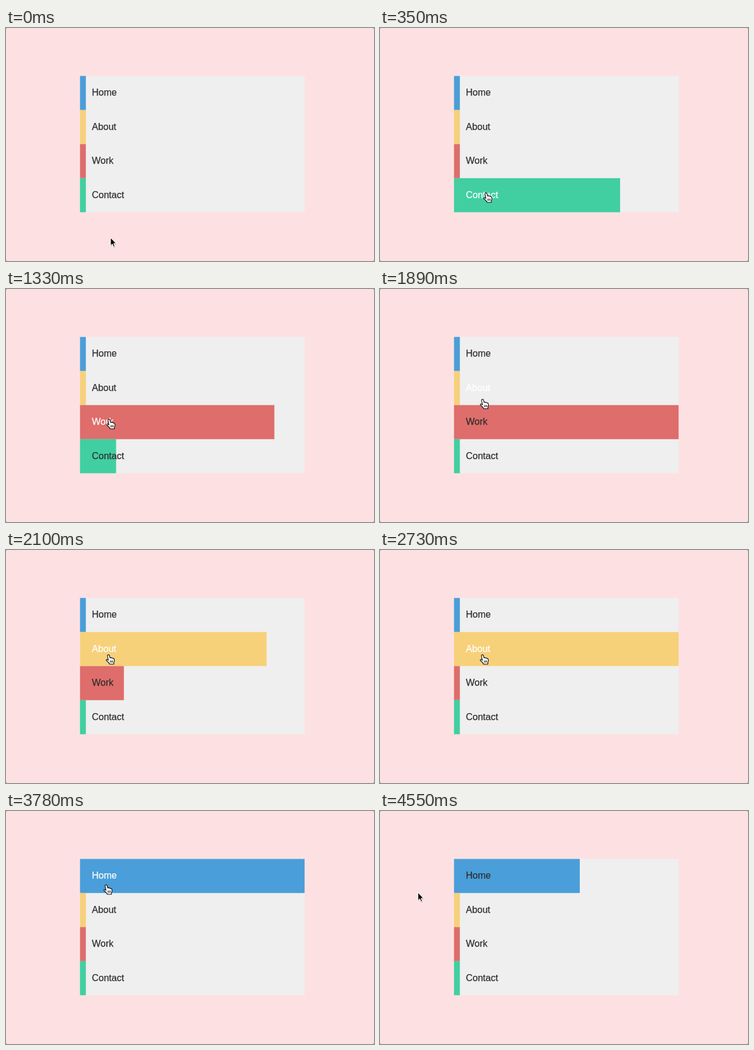
Animation, 630 px wide and 400 px high, one loop 4.62 s. Source, as an HTML page:

```html
<!DOCTYPE html>
<html lang="en">
<head>
<meta charset="utf-8">
<title>Menu hover</title>
<style>
  html, body { margin: 0; width: 100%; height: 100%; overflow: hidden; background: #fde1e2; }
  svg { display: block; }
  text { font: 16px "Liberation Sans", Arial, sans-serif; stroke-width: .25px; }
</style>
</head>
<body>
<svg width="630" height="400" viewBox="0 0 630 400">
  <rect width="630" height="400" fill="#6a6466"/>
  <rect width="630" height="400" rx="2" fill="#fde1e2"/>
  <rect x="126.7" y="82.3" width="384.5" height="234" fill="#efefef"/>
  <g id="menu"></g>
  <g id="arrow">
    <path d="M0 0V14.2L3.2 11.2L5.4 16.2L7.7 15.2L5.6 10.4H9.8Z" opacity=".18" transform="translate(.4 1.4)"/>
    <path d="M0 0V13.6L3.1 10.7L5.3 15.6L7.4 14.7L5.3 9.9H9.4Z" stroke="#fff"/>
  </g>
  <g id="hand" stroke="#000" stroke-linecap="round" stroke-linejoin="round">
    <path transform="translate(-5 -1)" fill="#fff" stroke-width="1.1"
      d="M4 1.5C5 .3 6.6 .8 7 2L8 6.2C8.6 5.3 10.2 5.4 10.7 6.6C11.5 5.9 12.8 6.2 13.2 7.4C14.2 6.9 15.2 7.5 15.4 8.8C15.8 11 15.5 12.5 14.6 14V17H7.3C6.8 15.2 4.5 13 2.2 11C.8 9.6 2 8.3 3.4 9L5.2 10.2L3.7 3Q3.5 2 4 1.5Z"/>
    <path d="M3.6 10v3m2-3v3m2-3v3" fill="none" stroke-width=".9"/>
  </g>
</svg>
<script>
const LOOP = 4620, TICK = 70, FADE = 400;
const LEFT = 126.7, TOP = 82.3, ROW = 58.5, THIN = 10, FULL = 384.5;

const items = [
  { label: "Home", fill: "#4a9ed9", from: 2910, to: 4442 },
  { label: "About", fill: "#f7d07a", from: 1890, to: 2910 },
  { label: "Work", fill: "#de6d6b", from: 1103, to: 1890 },
  { label: "Contact", fill: "#41cfa1", from: 175, to: 1103 }
];

// The pointer rests between these eased moves.
const home = { x: 179, y: 360 };
const moves = [
  { from: 70, to: 360, x: 181, y: 283 },
  { from: 910, to: 1260, x: 176, y: 224 },
  { from: 1680, to: 1980, x: 175, y: 180 },
  { from: 2730, to: 3080, x: 171, y: 127 },
  { from: 4340, to: 4550, x: 65, y: 140 }
];

const $ = id => document.getElementById(id);
const clamp = v => Math.min(1, Math.max(0, v));
const smooth = k => k * k * (3 - 2 * k);

// CSS "ease": cubic-bezier(.25, .1, .25, 1)
function ease(x) {
  x = clamp(x);
  const curve = (s, a, b) => 3 * a * s * (1 - s) ** 2 + 3 * b * s * s * (1 - s) + s ** 3;
  let lo = 0, hi = 1;
  for (let i = 0; i < 24; i++) {
    const mid = (lo + hi) / 2;
    if (curve(mid, .25, .25) < x) lo = mid; else hi = mid;
  }
  return curve(lo, .1, 1);
}

function add(tag, attrs) {
  const el = document.createElementNS("http://www.w3.org/2000/svg", tag);
  for (const k in attrs) el.setAttribute(k, attrs[k]);
  return $("menu").appendChild(el);
}

items.forEach((item, i) => {
  const y = TOP + i * ROW;
  item.bar = add("rect", { x: LEFT, y, height: ROW, fill: item.fill });
  item.text = add("text", { x: 147, y: Math.floor(y + 34.4) });
  item.text.textContent = item.label;
});

function pointer(t) {
  let { x, y } = home;
  for (const m of moves) {
    const k = smooth(clamp((t - m.from) / (m.to - m.from)));
    x += (m.x - x) * k;
    y += (m.y - y) * k;
  }
  return [x, y];
}

function draw(t) {
  let shape = "arrow";
  for (const { bar, text, from, to } of items) {
    const on = t >= from && t < to;
    const grown = ease((t - from) / FADE) - ease((t - to) / FADE);
    const ink = on ? "#fff" : "#2e2e2e";
    bar.setAttribute("width", THIN + (FULL - THIN) * grown);
    text.setAttribute("fill", ink);
    text.setAttribute("stroke", ink);
    if (on) shape = "hand";
  }
  for (const id of ["arrow", "hand"]) {
    $(id).setAttribute("transform", `translate(${pointer(t)})`);
    $(id).setAttribute("display", id === shape ? "inline" : "none");
  }
}

// The picture advances in 70 ms ticks; a small lead absorbs timer jitter.
const start = performance.now();
function frame() {
  const t = (performance.now() - start + 12) % LOOP;
  draw(Math.floor(t / TICK) * TICK);
  requestAnimationFrame(frame);
}
draw(0);
requestAnimationFrame(frame);
</script>
</body>
</html>
```
